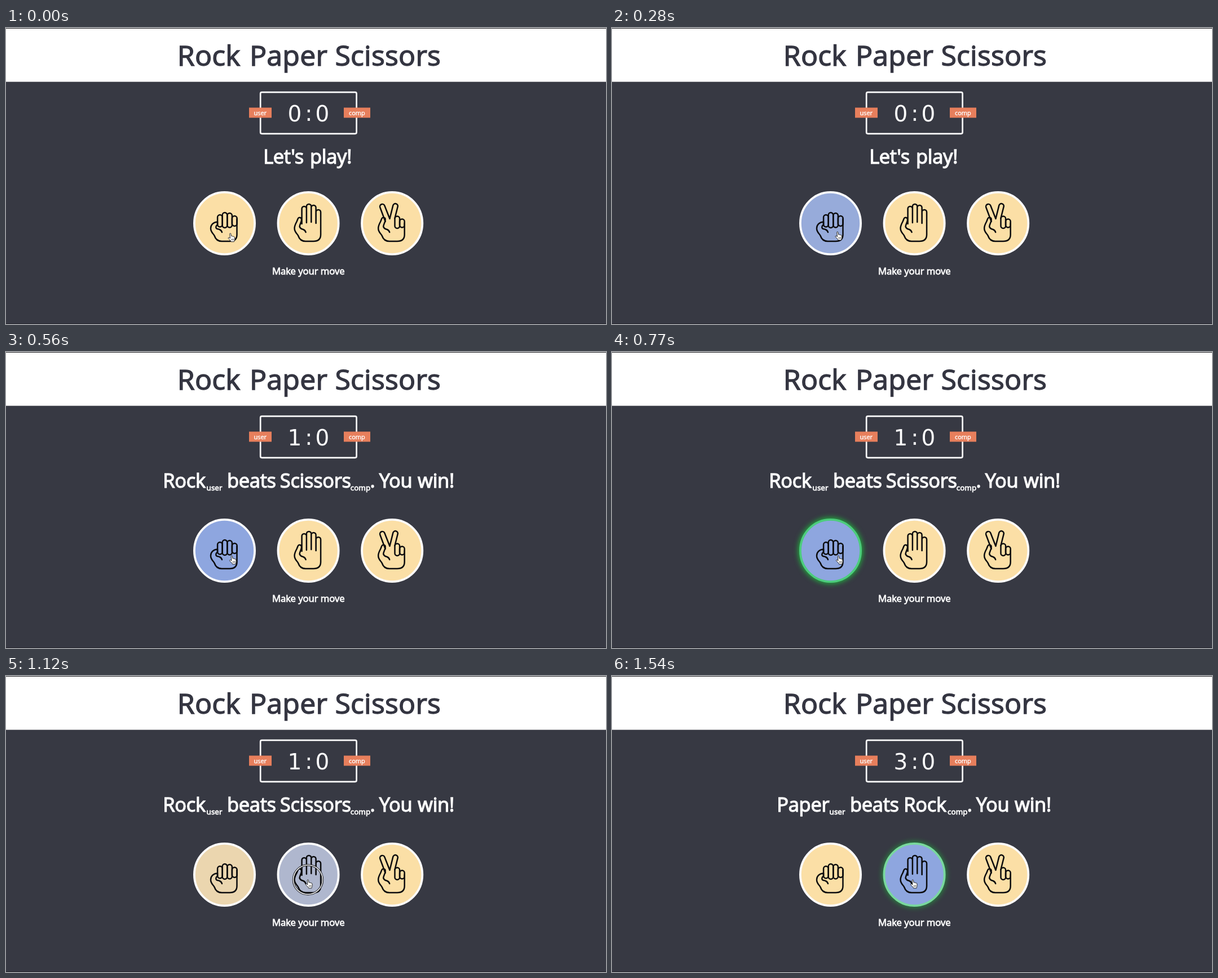
An HTML page for the animation above (1610 ms loop, 1064 by 526 pixels).

```html
<!DOCTYPE html>
<html lang="en">
<head>
<meta charset="utf-8">
<title>Rock Paper Scissors</title>
<style>
  html, body { margin: 0; width: 100%; height: 100%; overflow: hidden; background: #373943; }
  svg { display: block; width: 100vw; height: 100vh; }
  text { font-family: "Open Sans", "Noto Sans", sans-serif; text-anchor: middle; fill: #fdfdfd; stroke: #fdfdfd; }
  .title text { font-size: 50px; letter-spacing: .2px; fill: #343541; stroke: #343541; stroke-width: 1.4; }
  .head text { font-size: 34.5px; letter-spacing: -.3px; stroke-width: 1.3; }
  .head .sub { font-size: 13.5px; letter-spacing: 0; stroke-width: .8; }
  .score text { font: 39px "DejaVu Sans", sans-serif; stroke: none; }
  .tag text { font-size: 11px; stroke-width: .4; }
  .tag rect { fill: #e77f5c; }
  .note { font-size: 16.8px; letter-spacing: -.1px; stroke-width: .8; }
  .icon { fill: none; stroke: #0b0b0d; stroke-width: 2.5; stroke-linecap: round; stroke-linejoin: round; }
  .glow { fill: #1fb53c; filter: blur(5px); }
</style>
</head>
<body>
<svg viewBox="0 0 1064 526" preserveAspectRatio="none">
  <rect width="1064" height="526" fill="#373943"/>
  <rect width="1064" height="95.6" fill="#fff"/>
  <rect width="1064" height="1" fill="#1c1c20"/>
  <rect y="525" width="1064" height="1" fill="#24252c"/>
  <g class="title">
    <text x="359.8" y="67">Rock</text>
    <text x="501" y="67">Paper</text>
    <text x="677.3" y="67">Scissors</text>
  </g>
  <rect x="451.2" y="114.2" width="170.4" height="73.6" rx="2.5" fill="none" stroke="#fdfdfd" stroke-width="2.7"/>
  <g class="tag">
    <rect x="431" y="141.5" width="40" height="18"/>
    <text x="450.8" y="155">user</text>
    <rect x="599" y="141.5" width="47" height="18"/>
    <text x="622.4" y="155">comp</text>
  </g>
  <g class="score">
    <text id="user" x="512" y="166">0</text>
    <text x="536.8" y="165">:</text>
    <text x="561" y="166">0</text>
  </g>
  <g id="heads"></g>
  <g id="board">
    <g id="moves"></g>
    <text class="note" x="536.3" y="438">Make your move</text>
  </g>
  <g id="ring" fill="none">
    <circle r="26" stroke="#15161a" stroke-width="3.4"/>
    <circle r="26" stroke="#f4f4f4" stroke-width="1.5"/>
  </g>
  <g id="hand" stroke="#111" stroke-width=".9" stroke-linejoin="round">
    <path fill="#fff" d="M3.2 1.6C3.2 .2 5.2 .2 5.4 1.5L6 5.6C6.5 5 7.6 5.1 7.9 6C8.5 5.5 9.5 5.7 9.8 6.6C10.6 6.2 11.8 6.6 11.9 7.6L12.2 11C12.2 12.5 11.2 13.5 11 15.5H5.6C5.4 14 2.5 11.5 .8 9.6C0 8.4 1.4 7.4 2.6 8.3L4 9.4Z"/>
    <path fill="none" stroke-width=".7" d="M6.4 10.5V13M8.2 10.3V13M10 10.2V13"/>
  </g>
</svg>
<script>
const LOOP = 1610, STEP = 70;
const $ = id => document.getElementById(id);
const YELLOW = [251, 223, 166], BLUE = [142, 166, 223];
const WHITE = [253, 253, 253], GREEN = [77, 204, 125];

// Headings as [centre, word, is subscript]
const heads = [
  [[492, "Let's"], [576, "play!"]],
  [[316, "Rock"], [369.5, "user", 1], [435.3, "beats"], [548.8, "Scissors"],
   [628.5, "comp", 1], [650, "."], [691, "You"], [762.5, "win!"]],
  [[338.8, "Paper"], [399.5, "user", 1], [465.3, "beats"], [555, "Rock"],
   [612.8, "comp", 1], [634.3, "."], [675, "You"], [746.5, "win!"]]
];
$("heads").innerHTML = heads.map(words => `<g class="head">${words.map(([x, word, sub]) =>
  `<text x="${x}" y="${sub ? 246 : 241}"${sub ? ' class="sub"' : ""}>${word}</text>`).join("")}</g>`).join("");

// Icons are drawn around the centre of their circle
const pill = (x, top, bottom, w = 8.6) =>
  `<rect x="${x}" y="${top}" width="${w}" height="${bottom - top}" rx="${w / 2}"/>`;
const finger = (x, top, bottom, end, w = 8.3) =>
  `M${x} ${bottom}V${top + w / 2}a${w / 2} ${w / 2} 0 0 1 ${w} 0V${end}`;
const palm = right => `M22 ${right}V20C22 28 17 32 9 32H-5C-12 32 -16 28 -18 22C-20 18 -24.5 16 -24.5 9`;
const crease = "C-14 10.5 -11 10 -9 11C-6.5 12 -5 14 -4.5 16";
const tallThumb = `C-24.5 4 -22 0 -20.5 -3L-18.5 -8C-17 -11.5 -11.8 -10.5 -12 -6.5C-12 -2 -15 1 -15.5 6${crease}`;

const icons = [
  pill(-12.4, -15, 6.5) + pill(-3.8, -19, 8) + pill(4.8, -18, 7.5) + pill(13.4, -13, 5, 8.8) +
    `<path d="${palm(-8)}C-24.5 3 -20 -2 -12.5 -2.5V3C-15 4 -16 7 -14.5 9${crease}"/>`,
  `<path d="${finger(-11.5, -30, 1, -1)}${finger(-3.2, -34, -2, -2, 8.4)}` +
    `${finger(5.2, -32, -2, 0)}${finger(13.6, -24, 0, 0, 8.4)}${palm(-2)}${tallThumb}"/>`,
  `<path d="M-12 -3L-21.4 -28.3a4.3 4.3 0 0 1 8.1 -2.9L-4.2 -8L1.6 -31.6a4.3 4.3 0 0 1 8.4 2L4.8 -9"/>` +
    pill(4.8, -12.5, 9) + pill(13.4, -7.5, 7.5) + `<path d="${palm(0)}${tallThumb}"/>`
];
$("moves").innerHTML = icons.map((icon, i) => `<g transform="translate(${387.5 + 148.6 * i} 347)">
  <ellipse class="glow" rx="57" ry="58.5" opacity="0"/>
  <ellipse class="disc" rx="53.6" ry="55.1" stroke-width="3.8"/>
  <g class="icon">${icon}</g></g>`).join("");

// Tracks of [time, value], linear between points
const hover = [
  [[0, 0], [70, .2], [210, .78], [280, .92], [350, 1], [840, 1], [910, .85], [980, .6], [1120, .15], [1190, 0]],
  [[910, 0], [980, .12], [1050, .4], [1120, .7], [1190, .93], [1260, 1]],
  [[0, 0]]
];
const win = [
  [[560, 0], [700, .75], [770, 1], [840, 1], [910, .7], [980, .33], [1050, .1], [1120, 0]],
  [[1400, 0], [1470, .4], [1540, .75]],
  [[0, 0]]
];
const handX = [[0, 393.5], [280, 395.5], [560, 396], [770, 397], [840, 416], [910, 484],
  [980, 530], [1120, 531], [1260, 531], [1540, 529]];
const handY = [[0, 364.3], [280, 361.5]];
const WIN1 = 490, WIN2 = 1190;
const clicks = [[420, 399.5, 362], [1120, 535.5, 362]];

const mix = (a, b, k) => a + (b - a) * k;
const blend = (a, b, k) => `rgb(${a.map((v, i) => Math.round(mix(v, b[i], k)))})`;
function at(track, t) {
  const i = track.findIndex(p => p[0] > t);
  if (i < 0) return track[track.length - 1][1];
  if (!i) return track[0][1];
  const [t0, a] = track[i - 1], [t1, b] = track[i];
  return mix(a, b, (t - t0) / (t1 - t0));
}
const move = (el, x, y) => el.setAttribute("transform", `translate(${x} ${y})`);

const headEls = [...document.querySelectorAll(".head")];
const discs = [...document.querySelectorAll(".disc")];
const glows = [...document.querySelectorAll(".glow")];

function draw(t) {
  const round = t < WIN1 ? 0 : t < WIN2 ? 1 : 2;
  headEls.forEach((el, i) => el.style.display = i === round ? "" : "none");
  $("user").textContent = [0, 1, 3][round];
  move($("board"), 0, round ? 6 : 0);
  discs.forEach((el, i) => {
    const w = at(win[i], t);
    el.setAttribute("fill", blend(YELLOW, BLUE, at(hover[i], t)));
    el.setAttribute("stroke", blend(WHITE, GREEN, w));
    glows[i].setAttribute("opacity", w ** 1.5);
  });
  const click = clicks.find(c => t >= c[0] && t < c[0] + STEP);
  $("ring").style.display = click ? "" : "none";
  if (click) move($("ring"), click[1], click[2]);
  move($("hand"), at(handX, t), at(handY, t));
}

const start = performance.now();
function tick() {
  const t = (performance.now() - start) % LOOP;
  draw(Math.floor(t / STEP) * STEP);
  requestAnimationFrame(tick);
}
tick();
</script>
</body>
</html>
```
